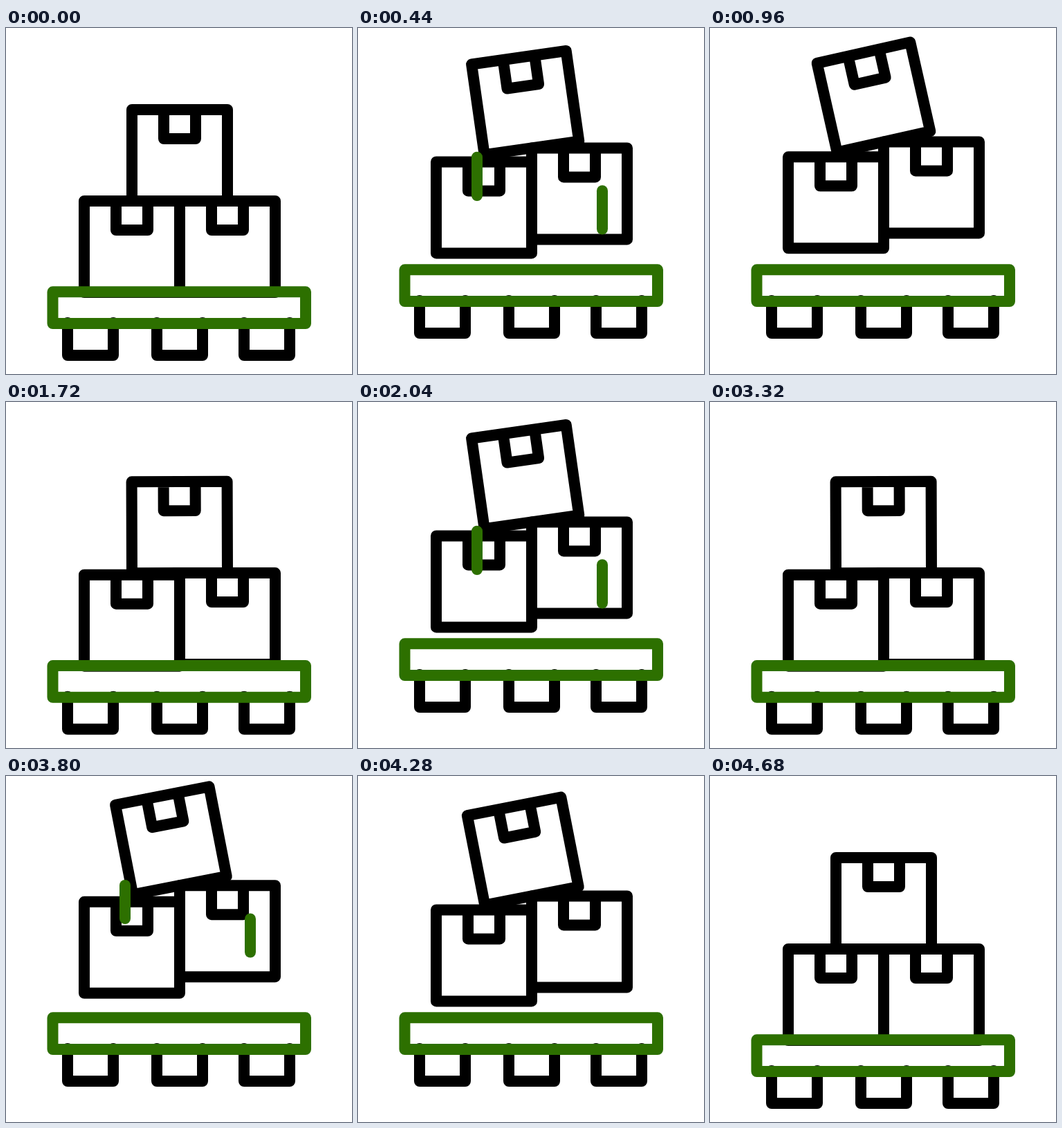
An HTML page that plays this animation: 500x500 px, repeating every 4.88 s.

```html
<!DOCTYPE html>
<html lang="en">
<head>
<meta charset="utf-8">
<title>Pallet with boxes</title>
<style>
  html, body { margin: 0; width: 100%; height: 100%; overflow: hidden; background: #fff; }
  svg { display: block; width: 100vw; height: 100vh; }
  .ink { fill: none; stroke: #000; stroke-width: 16; stroke-linejoin: round; stroke-linecap: round; }
  .green { stroke: #2d7000; }
</style>
</head>
<body>
<svg viewBox="0 0 500 500">
  <defs>
    <path id="box" d="M0 0H138V132H0ZM46 0V42H92V0"/>
    <path id="leg" d="M0 426V473H66V426"/>
  </defs>
  <g class="ink">
    <g id="left"><use href="#box" x="113" y="250"/></g>
    <g id="right"><use href="#box" x="251" y="250"/></g>
    <g id="top"><use href="#box" x="182" y="118"/></g>
    <g id="pallet">
      <use href="#leg" x="89"/>
      <use href="#leg" x="218"/>
      <use href="#leg" x="344"/>
      <path class="green" d="M67.5 381.3H433V427H67.5Z"/>
    </g>
    <line id="dash1" class="green" x1="172" x2="172"/>
    <line id="dash2" class="green" x1="353" x2="353"/>
  </g>
</svg>
<script>
  const LOOP = 4880, TICK = 40;           // whole loop and display step, ms
  const HOP = 1630, STEP = 50, DELAY = 5; // one hop and its pose step, ms
  const END = 28;                         // poses in one hop

  const $ = id => document.getElementById(id);
  const [left, right, topBox, pallet] = ['left', 'right', 'top', 'pallet'].map($);
  const dashes = [
    { el: $('dash1'), low: 258.5 },
    { el: $('dash2'), low: 307 }
  ];
  const DASH_RUN = 105;

  const ease = (k, from, to) => {
    const u = Math.min(1, Math.max(0, (k - from) / (to - from)));
    return u * u * (3 - 2 * u);
  };
  // Rise between a and b, mirrored fall at the end of the hop
  const pulse = (k, a, b) => ease(k, a, b) - ease(k, END - b, END - a);
  const lift = (el, y, extra = '') =>
    el.setAttribute('transform', `translate(0 ${-y.toFixed(2)}) ${extra}`);

  function poseAt(time) {
    const t = Math.floor((time % LOOP) / TICK) * TICK - DELAY;
    const k = Math.floor((Math.max(0, t) % HOP) / STEP);
    return k >= END ? 0 : k;
  }

  function draw(k) {
    const high = k ? 94.8 * pulse(k, -0.2, 11.2) : 0;
    const tilt = 15.6 * (ease(k, 0, 15.6) - ease(k, 15.6, END));
    lift(right, high);
    lift(topBox, high, `rotate(${-tilt.toFixed(2)} 251 250)`);
    lift(left, 69.4 * pulse(k, 0.6, 10.8));
    lift(pallet, 32 * pulse(k, 0.7, 6.7));

    const head = ease(k, 3, 11), tail = ease(k, 6, 14);
    for (const { el, low } of dashes) {
      el.setAttribute('y1', low - DASH_RUN * head);
      el.setAttribute('y2', low - DASH_RUN * tail);
      el.style.display = head > tail ? '' : 'none';
    }
  }

  const start = performance.now();
  function frame() {
    draw(poseAt(performance.now() - start));
    requestAnimationFrame(frame);
  }
  frame();
</script>
</body>
</html>
```
